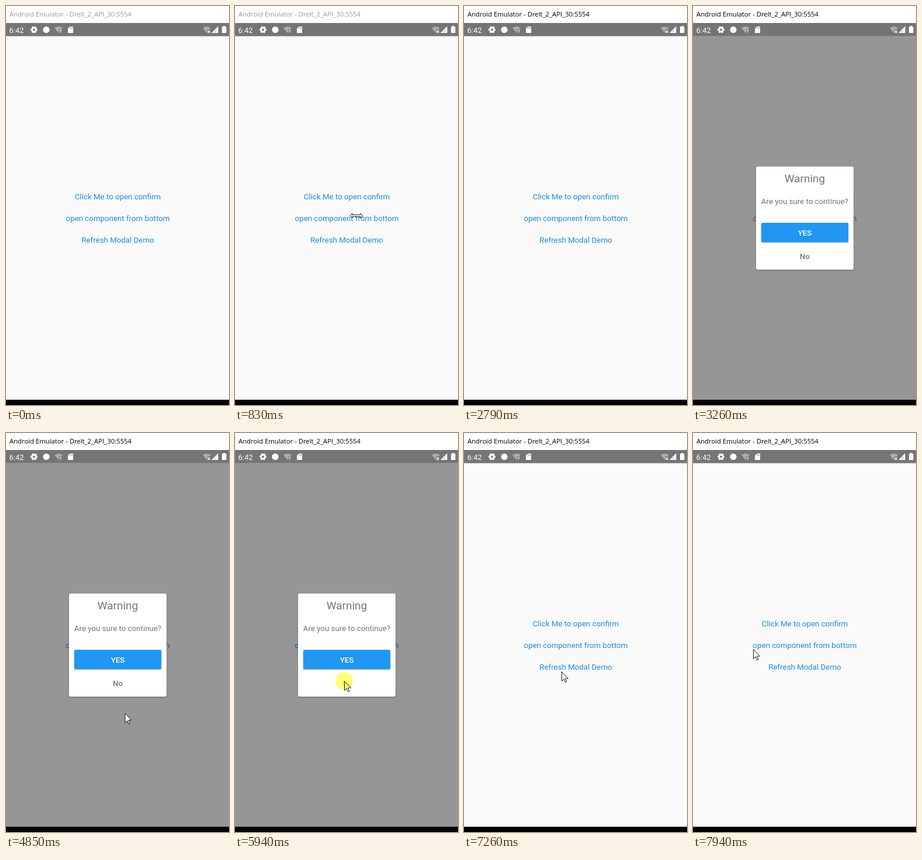
An HTML page for the animation above (8 s loop, 382x681 px).

```html
<!DOCTYPE html>
<html lang="en">
<head>
<meta charset="utf-8">
<title>Confirm dialog demo</title>
<style>
  html, body { margin: 0; width: 100%; height: 100%; overflow: hidden; background: #fafafa; }
  svg { display: block; width: 382px; height: 681px; }
  text { font-family: Roboto, sans-serif; font-size: 13.3px; }
  #title { font: 11.3px "Open Sans", "Noto Sans", sans-serif; }
  .mid { text-anchor: middle; }
  .links { fill: #2089dc; }
  .dim { opacity: .4; }
  #halo { mix-blend-mode: multiply; }
</style>
</head>
<body>
<svg viewBox="0 0 382 681">
  <rect width="382" height="681" fill="#fafafa"/>
  <rect width="382" height="29" fill="#fff"/>
  <text id="title" x="6" y="18">Android Emulator - Drelt_2_API_30:5554</text>

  <!-- status bar -->
  <rect y="29" width="382" height="22.5" fill="#757575"/>
  <g fill="#fff">
    <text x="5.5" y="45.5" style="font-size:13px">6:42</text>
    <circle cx="48" cy="40.5" r="3.4" fill="none" stroke="#fff" stroke-width="3"/>
    <circle cx="48" cy="40.5" r="5.2" fill="none" stroke="#fff" stroke-width="1.8" stroke-dasharray="2.9 2.545" stroke-dashoffset="1.45"/>
    <circle cx="69" cy="40.5" r="5.6"/>
    <path class="dim" d="M83 37.5q7-5 14 0l-2 2.5h-4v5l-1 1z"/>
    <text x="91.5" y="45.5" style="font-size:8px;font-weight:700">?</text>
    <path d="M109.5 35h5.5v11h-9v-7.5z"/>
    <path d="M109.5 36.5v2m2-2v2m2-2v2" stroke="#757575"/>
    <path class="dim" d="M337 37.5q7-5 14 0l-2.5 3h-4v5l-.5.5z"/>
    <path d="M345.5 42l4 4m0-4l-4 4" stroke="#fff" stroke-width="1.2"/>
    <path d="M363.5 34.5V46H352z"/>
    <path d="M360.5 39v5.8h-5.8z" fill="#757575" opacity=".25"/>
    <path d="M372 34h3.5v1.3h2V46h-7.5V35.300h2z"/>
  </g>

  <g class="links mid">
    <text x="191.5" y="330">Click Me to open confirm</text>
    <text x="191.5" y="367">open component from bottom</text>
    <text x="191.5" y="404">Refresh Modal Demo</text>
  </g>

  <g id="dialog" class="mid" fill="#757575">
    <rect y="51.5" width="382" height="620.500" fill="#000" opacity=".4"/>
    <rect x="108" y="274" width="167" height="176" rx="3" fill="#fff" style="filter:drop-shadow(0 1px 1px #0005)"/>
    <text x="191.500" y="301" style="font-size:19px">Warning</text>
    <text x="191.500" y="338">Are you sure to continue?</text>
    <rect x="117" y="370" width="149" height="33" rx="2" fill="#2196f3" style="filter:drop-shadow(0 1px 1px #0006)"/>
    <text x="191.500" y="392" fill="#fff" font-weight="500">YES</text>
    <text id="no" x="191.500" y="431.500" font-weight="500">No</text>
  </g>

  <rect y="672" width="382" height="9" fill="#000"/>

  <g id="cursor" fill="#fff" stroke="#000">
    <path id="resize" d="M-11 0l4-4v2.500H7V-4l4 4-4 4V1.500H-7V4z" stroke-width=".9"/>
    <path id="arrow" d="M.5.5v16l3.700-3.500 2.500 5.500 2.200-1-2.500-5.500h5.100z" stroke-width=".9"/>
  </g>
  <circle id="halo" r="15" fill="#ffff78"/>
</svg>
<script>
const LOOP = 8000;
const el = id => document.getElementById(id);
const between = (t, a, b) => t >= a && t < b;
const show = (id, on) => el(id).style.display = on ? "" : "none";

// Pointer moves; those with "from" bring the pointer in from outside.
const moves = [
  { start: 200, end: 970, steps: 12, from: [330.5, 663], to: [197.5, 332.5] },
  { start: 1040, end: 1170, steps: 2, to: [197.5, 326.5] },
  { start: 2510, end: 2720, steps: 4, to: [268.5, 467.5] },
  { start: 3720, end: 4060, steps: 5, from: [343, 668], to: [208, 492] },
  { start: 4850, end: 5260, steps: 7, to: [187, 423] },
  { start: 7260, end: 7600, steps: 6, to: [103, 357] },
  { start: 7800, end: 7940, steps: 3, to: [103, 369] }
];

function pointerAt(t) {
  let pos = [0, 0];
  for (const { start, end, steps, from, to } of moves) {
    if (t < start) break;
    const done = Math.min(steps - 1, Math.floor((t - start) / (end - start) * (steps - 1)));
    const part = from ? done / (steps - 1) : (done + 1) / steps;
    const ease = 1 - (1 - part) ** 1.5;
    const origin = from || pos;
    pos = origin.map((v, i) => Math.round((v + (to[i] - v) * ease) * 2) / 2);
  }
  return pos;
}

function draw(t) {
  const place = `translate(${pointerAt(t)})`;
  const resizing = between(t, 200, 2790);
  const pressing = between(t, 5940, 6070);
  el("cursor").setAttribute("transform", place);
  el("halo").setAttribute("transform", place);
  el("title").setAttribute("fill", t < 1770 ? "#999" : "#000");
  el("no").setAttribute("opacity", pressing ? .15 : 1);
  show("resize", resizing);
  show("arrow", t >= 3720);
  show("halo", between(t, 1770, 1900) || pressing);
  show("dialog", between(t, 3260, 6070));
}

function tick() {
  draw(performance.now() % LOOP);
  requestAnimationFrame(tick);
}
tick();
</script>
</body>
</html>
```
